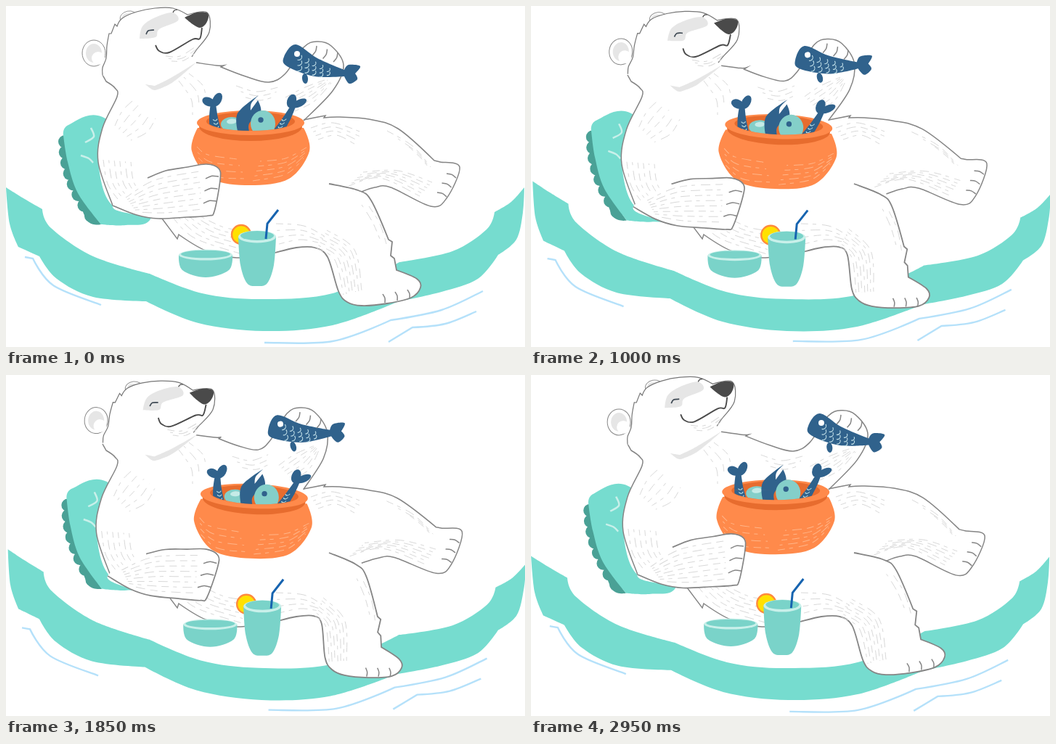
An HTML page with a canvas for the animation above (3000 ms loop, 715x470 px).

```html
<!DOCTYPE html>
<html lang="en">
<head>
<meta charset="utf-8">
<title>Polar bear on a float</title>
<style>
  html, body { margin: 0; width: 100%; height: 100%; overflow: hidden; background: #fff; }
  canvas { display: block; }
</style>
</head>
<body>
<canvas width="715" height="470"></canvas>
<script>
const ctx = document.querySelector('canvas').getContext('2d');
const TEAL = '#76dccf', DISH = '#7ad3c9', PALE = '#c9f0ea', NAVY = '#30628c';
const ORANGE = '#ff8a4b', RUST = '#e76c2e', INK = '#858585', SHADE = '#e6e6e6';
const LOOP = 3000, STEP = 50;
let k = 0; // 0 = start pose, 1 = far pose

// Smoothstep of v from a to b
function ease(v, a, b) {
  const t = Math.max(0, Math.min(1, (v - a) / (b - a)));
  return t * t * (3 - 2 * t);
}

// Bends: how far a point travels between the two poses
const still = () => [0, 0];
const torsoBend = ({ y }) => {
  const w = ease(y, 115, 200);
  return [-3 * w, 4 * w];
};
const armBend = ({ x, y }) => {
  const out = ease(x, 270, 390), w = out * ease(165 - y, 0, 90);
  return [-29 * w, 6 * (1 - out) - 5 * w];
};
const farLegBend = ({ x, y }) => {
  const w = ease(x, 430, 550);
  return [w * (0.1 * (y - 210) + 3), w * (0.1 * (530 - x) + 2)];
};
const nearLegBend = ({ x, y }) => {
  const w = ease(x, 415, 460), dx = x - 445, dy = y - 245;
  return [w * (-0.09 * dx - 0.151 * dy), w * (0.217 * dx - 0.051 * dy)];
};

// "x,y x,y! ..." where ! marks a sharp corner
const parse = s => s.split(' ').map(p => {
  const [x, y] = p.split(',').map(parseFloat);
  return { x, y, sharp: p.endsWith('!') };
});
const pose = (pts, bend) => pts.map(p => {
  const [dx, dy] = bend(p);
  return { x: p.x + dx * k, y: p.y + dy * k, sharp: p.sharp };
});

// Smooth curve through the points
function trace(pts, closed) {
  const n = pts.length;
  const at = i => closed ? pts[(i + n) % n] : pts[Math.max(0, Math.min(n - 1, i))];
  const handle = (i, dir) => {
    const p = at(i), a = at(i - 1), b = at(i + 1), f = p.sharp ? 0 : dir / 6;
    return [p.x + (b.x - a.x) * f, p.y + (b.y - a.y) * f];
  };
  ctx.beginPath();
  ctx.moveTo(pts[0].x, pts[0].y);
  for (let i = 0; i < (closed ? n : n - 1); i++)
    ctx.bezierCurveTo(...handle(i, 1), ...handle(i + 1, -1), at(i + 1).x, at(i + 1).y);
}
function ink(color, width) {
  ctx.strokeStyle = color;
  ctx.lineWidth = width;
  ctx.stroke();
}
function line(path, bend = still, color = INK, width = 1.5) {
  trace(pose(parse(path), bend));
  ink(color, width);
}
function blob(path, fill, bend = still) {
  trace(pose(parse(path), bend), true);
  ctx.fillStyle = fill;
  ctx.fill();
}
function oval(x, y, rx, ry, fill, tilt = 0) {
  ctx.beginPath();
  ctx.ellipse(x, y, rx, ry, tilt, 0, 7);
  ctx.fillStyle = fill;
  ctx.fill();
}
// Dashed strokes spread evenly between two curves
function fur(from, to, n, bend = still, color = '#d8d8d8') {
  const a = parse(from), b = parse(to);
  ctx.setLineDash([10, 6, 5, 8, 13, 7]);
  for (let i = 0; i < n; i++) {
    const t = i / (n - 1);
    const mid = a.map((p, j) => ({ x: p.x + (b[j].x - p.x) * t, y: p.y + (b[j].y - p.y) * t }));
    ctx.lineDashOffset = i * 17;
    trace(pose(mid, bend));
    ink(color, 1);
  }
  ctx.setLineDash([]);
}
// Claw marks at evenly spaced places
function claws(n, x, y, stepX, stepY, hookX, hookY, bend) {
  for (let i = 0; i < n; i++) {
    const a = x + i * stepX, b = y + i * stepY;
    line(`${a},${b} ${a + hookX / 2 + hookY / 8},${b + hookY / 2 - hookX / 8} ${a + hookX},${b + hookY}`, bend);
  }
}
// Draws a part turned and shifted in proportion to the pose
function move(deg, cx, cy, dx, dy, draw) {
  ctx.save();
  ctx.translate(cx + dx * k, cy + dy * k);
  ctx.rotate(deg * k * Math.PI / 180);
  ctx.translate(-cx, -cy);
  draw();
  ctx.restore();
}

function water() {
  const wave = (path, dx, dy) => line(path, () => [dx, dy], '#b5e1fa', 2.4);
  wave('26,346 37,348! 65,385 131,412', -5, 3);
  wave('356,464 450,462 530,433! 600,419 657,393', 7, -3);
  wave('527,463 560,443! 605,438 648,421', 8, -3);
}

function float() {
  const rim = '0,250! 24,265 50,280! 62,306 120,345 198,369! 270,396 350,404 450,396 542,353! 615,338 662,308 673,284! 696,270';
  const hull = '714,250! 712,285 703,322 678,343! 650,376 600,394 541,407! 450,440 355,448 265,437 193,407! 120,401 70,376 46,345! 17,332! 5,300';
  blob(rim + ' ' + hull, TEAL);
  for (let i = 0; i < 8; i++) oval(81 + (i / 7) ** 2 * 36, 187 + i * 14.6, 9, 9, '#4aa196');
  blob('96,255! 131,301! 112,296', '#4aa196');
  blob('79,178! 86,164 133,153 205,220 200,292 165,302 131,301! 99,258 85,215', TEAL);
  line('117,168 121,180 109,188', still, PALE, 2.5);
  line('103,206 114,210 120,216', still, PALE, 2.5);
}

function body() {
  const left = '133,95 138,104! 150,113 153,125 133,168 127,215 147,275';
  blob(left + ' 215,293! 240,318 330,340! 400,250 300,85!', '#fff', torsoBend);
  line(left, torsoBend);
  line('215,293 236,321! 238,315! 275,337 318,347 371,340');
  fur('150,165 160,145 175,130', '172,185 194,174 206,155', 5, torsoBend);
  fur('134,212 140,245 157,270', '172,215 177,245 198,272', 6, torsoBend);
  fur('238,103 255,128 257,150', '252,93 270,108 275,122', 3);
  fur('230,292 260,320 325,342', '268,290 300,305 330,310', 6);
}

function farLeg() {
  line('410,157 440,151! 438,154! 460,153 500,156 540,169 590,213! 598,215 625,222 607,265 585,276 530,250 508,250 487,257', farLegBend);
  claws(3, 607, 231, -6.5, 13, 13, 6, farLegBend);
  fur('420,168 450,161 490,174', '430,184 455,178 480,190', 4);
  fur('472,248 515,237 570,262', '492,229 540,227 587,243', 6, farLegBend);
  fur('525,172 560,193 585,222', '555,194 572,210 584,225', 3, farLegBend);
}

function raisedArm() {
  line('262,78 290,82 300,82! 296,84! 330,97 362,105 385,93 410,57 428,49 448,55 465,82 450,117 410,158', armBend);
  fur('385,126 412,112 442,101', '398,145 425,131 448,106', 6, armBend);
  fur('317,110 345,118 375,112', '330,126 350,130 370,125', 3, armBend);
  move(-15, 401, 66, -29, 2, fish);
  claws(3, 428, 55, 14.5, 4.5, -6, 13, armBend);
}

function fish() {
  oval(412, 100, 4, 7, NAVY, -0.1);
  blob('383,70 399,53 429,72 466,88! 472,81 488,83 481,93! 484,101 473,107 466,97! 425,97 387,83', NAVY);
  oval(401, 66, 4, 4, '#fff');
  for (let i = 0; i < 14; i++) {
    const col = Math.floor(i / 3), row = i % 3;
    ctx.beginPath();
    ctx.arc(403 + col * 10, 70 + col * 4.3 + row * (7.5 - col * 0.6), 4.5 - col * 0.3, -0.5, 1.9);
    ink('#c0dfe8', 1.2);
  }
}

// A fish tail sticking up; flip = -1 mirrors it
function tail(x, y, flip) {
  ctx.save();
  ctx.translate(x, y);
  ctx.scale(flip, 1);
  oval(-7, -6, 9, 6, NAVY, 0.4);
  oval(5, -9, 10, 6, NAVY, -1.1);
  blob('-4,-4! -6,15 -5,38! 12,38! 6,16 3,-4!', NAVY);
  ctx.restore();
}
function scales(x, y, stepX) {
  for (let i = 0; i < 3; i++) {
    ctx.beginPath();
    ctx.arc(x + i * stepX, y + i * 5, 3, 0.2, 2.7);
    ink('#c2e5e8', 1.1);
  }
}

function pot() {
  blob('264,168! 256,200 283,238 336,247 390,238 418,200 410,168!', ORANGE);
  oval(337, 166, 71, 20, RUST);
  oval(337, 161, 74, 17, ORANGE);
  oval(337, 159, 61, 13, RUST);
  ctx.save();
  ctx.beginPath();
  ctx.rect(260, 100, 160, 58);
  ctx.ellipse(337, 158, 61, 14, 0, 0, Math.PI);
  ctx.clip();
  tail(286, 138, 1);
  scales(288, 155, 1);
  ctx.save();
  ctx.transform(1, 0, -0.5, 1, 70, 0); // lean the second tail to the left
  tail(394, 140, -1);
  scales(391, 155, 0);
  ctx.restore();
  oval(311, 163, 15, 10, '#84cfc9');
  oval(311, 159, 7, 3.5, '#c5ebe7', -0.1);
  blob('320,176! 319,148 348,123! 338,134 337,144! 347,130! 351,146 335,162 336,176!', NAVY);
  oval(354, 162, 17, 18, '#84cfc9');
  oval(351, 157, 3.7, 3.7, NAVY);
  ctx.restore();
  fur('263,194 278,205 318,211', '266,217 290,235 330,238', 4, still, '#ffb588');
  fur('340,241 385,232 410,210', '350,214 385,210 414,195', 5, still, '#ffb588');
}

function nearLeg() {
  const leg = '371,340 400,333 425,333 443,346 458,393 470,408 490,413 525,410 558,402 571,388 566,376 538,364! 535,348! 530,344! 532,325! 527,322! 503,268 485,254 445,245';
  blob(leg + '!', '#fff', nearLegBend);
  line(leg, nearLegBend, INK, 1.8);
  claws(3, 519, 397, 17, -3, 3, 12, nearLegBend);
  fur('428,334 453,350 465,398', '442,309 480,336 490,392', 7, nearLegBend);
  fur('372,300 410,303 440,318', '376,328 405,322 430,326', 4, nearLegBend);
  fur('500,276 515,300 524,328', '490,274 505,298 517,326', 2, nearLegBend);
}

function bowl() {
  blob('238,343! 243,364 275,374 307,364 312,343!', DISH);
  oval(275, 343, 37, 7.5, PALE);
  oval(275, 342, 34, 5.3, DISH);
}

function cup() {
  oval(324, 315, 13, 13, '#ffe100');
  ink('#ff8a3c', 2.4);
  blob('320,318! 323,357 332,382 346,386 360,382 369,357 372,318!', DISH);
  oval(346, 318, 26, 8.5, PALE);
  oval(346, 316.5, 23, 6.5, DISH);
  line('358,321 360,300! 375,281', still, '#1764b0', 3);
}

function nearArm() {
  const arm = '195,237 220,227 250,222 276,218 293,224 295,240 287,283 279,289 250,291 210,293 180,288 147,275';
  blob(arm, '#fff');
  line(arm, still, INK, 1.7);
  claws(3, 275, 238, -1.5, 17, 18, -3);
  fur('165,264 205,240 266,228', '180,284 220,285 270,280', 8);
}

function head() {
  const outline = '133,95 133,85 138,72 139,55 142,38! 145,38! 150,25! 153,28! 160,17 180,8 205,3 230,3 250,12! 277,9 280,36 262,61 256,70';
  oval(169, 16, 12, 9, '#fff', -0.2);
  ink('#999', 1);
  oval(168, 15, 8, 5, SHADE);
  oval(121, 65, 16, 18, '#fff');
  ink('#888', 1);
  oval(121, 65, 11, 13, SHADE);
  oval(127, 72, 9, 9, '#fff');
  blob(outline + ' 235,95 205,112 160,110!', '#fff');
  line(outline, still, '#777', 1.2);
  blob('184,45! 188,28 205,16 229,9 237,20 211,32 206,43', SHADE);
  blob('246,16! 262,9 276,9 279,15 275,25 267,30 257,25', '#4a4a4a');
  line('193,39 196,34 204,33', still, '#3f4a54', 1.7);
  line('230,9 232,6 236,5', still, '#555', 1.4);
  line('206,54 211,62 225,64 257,46 267,45 270,30', still, '#4a4a4a', 1.9);
  fur('220,69 240,69 264,54', '228,76 245,75 266,61', 3);
}
const cheek = () => blob('192,108! 201,115 206,116! 230,105 263,77! 229,98 205,110!', SHADE);

function frame() {
  const t = Math.floor(performance.now() % LOOP / STEP) * STEP;
  k = (1 - Math.abs(t / (LOOP / 2) - 1)) * 1.034;
  ctx.fillStyle = '#fff';
  ctx.fillRect(0, 0, 715, 470);
  water();
  move(2, 357, 340, 0, 0, float);
  body();
  farLeg();
  raisedArm();
  move(3.2, 337, 200, 4, 7.5, pot);
  nearLeg();
  move(0, 0, 0, 8, 1, bowl);
  move(0, 0, 0, 9, 1, cup);
  move(11, 150, 270, -8, 3, nearArm);
  move(6.3, 150, 100, 0, 0, head);
  move(3, 150, 100, 0, 0, cheek);
  requestAnimationFrame(frame);
}
frame();
</script>
</body>
</html>
```
